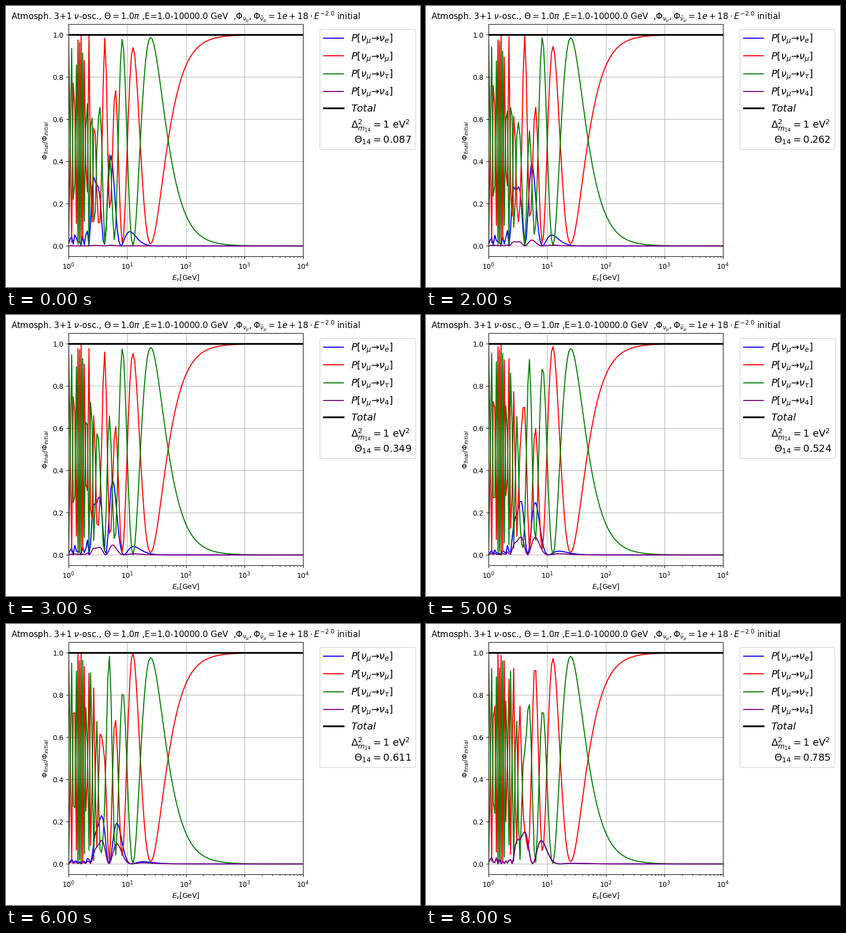
A matplotlib script that plays this animation: 821 by 559 pixels, repeating every 9 s.

```python
import numpy as np
import matplotlib.pyplot as plt
from matplotlib.animation import FuncAnimation

plt.rcParams["font.family"] = "DejaVu Sans"

W, H, DPI = 821, 559, 100
KM = 5.06773e9        # 1 km in 1/eV
R_EARTH = 6371.0
ATMOSPHERE = 22.0     # production height, km
STEPS = 150           # radial steps from surface to centre

energy = np.logspace(0, 4, 150)
angles = np.radians(np.arange(5, 50, 5))


def density(x):
    """Simplified PREM density in g/cm^3 at x = r/R."""
    if x < 0.1917:
        return 13.09 - 8.84 * x**2
    if x < 0.5462:
        return 12.49 - 8.65 * x**2
    if x < 0.8948:
        return 7.44 - 3.40 * x
    return max(11.25 - 8.03 * x, 3.37)


def rotation(i, j, a):
    m = np.eye(4)
    m[i, i] = m[j, j] = np.cos(a)
    m[i, j], m[j, i] = np.sin(a), -np.sin(a)
    return m


def vacuum_hamiltonian(th14):
    u = (rotation(0, 3, th14) @ rotation(1, 2, 0.737324)
         @ rotation(0, 2, 0.148190) @ rotation(0, 1, 0.583996))
    mass = u @ np.diag([0, 7.5e-5, 2.56e-3, 1.0]) @ u.T
    return mass / (2e9 * energy[:, None, None])


def potential(x):
    ye = 0.4656 if x < 0.5462 else 0.4957
    cc = 7.632e-14 * density(x) * ye
    nc = -0.5 * cc * (1 - ye) / ye
    return np.diag([cc + nc, nc, nc, 0])


def evolve(ham, km):
    w, v = np.linalg.eigh(ham)
    phase = np.exp(-1j * w * km * KM)
    return (v * phase[..., None, :]) @ np.swapaxes(v, -1, -2)


def probabilities():
    """P(nu_mu -> x) straight through the Earth, shape (angle, energy, x)."""
    ham = np.array([vacuum_hamiltonian(a) for a in angles])
    half = np.eye(4)
    for k in range(STEPS):
        x = 1 - (k + 0.5) / STEPS
        half = evolve(ham + potential(x), R_EARTH / STEPS) @ half
    # the second half of the path mirrors the first
    full = np.swapaxes(half, -1, -2) @ half @ evolve(ham, ATMOSPHERE)
    return np.abs(full[..., :, 1]) ** 2


def angle_label(th14):
    return ("$\\Delta_{m_{14}}^2=1$ eV$^2$\n"
            f" $\\Theta_{{14}}={th14:.3f}$")


prob = probabilities()

fig = plt.figure(figsize=(W / DPI, H / DPI), dpi=DPI, facecolor="white")
ax = fig.add_axes([124 / W, 60.7 / H, 465 / W, 462 / H])
ax.set_xscale("log")

curves = []
for color, name in zip(["blue", "red", "green", "purple"],
                       [r"e", r"\mu", r"\tau", "4"]):
    label = rf"$P[\nu_{{\mu}}→\nu_{{{name}}}]$"
    curves += ax.plot(energy, energy * 0, color=color, lw=1.5, label=label)
ax.plot(energy, np.ones_like(energy), color="black", lw=2.5, label="$Total$")
ax.plot([], [], " ", label=angle_label(angles[0]))

ax.set_xlim(1, 1e4)
ax.set_ylim(-0.05, 1.05)
ax.grid(True)
ax.set_xlabel(r"$E_{\nu}$[GeV]")
ax.set_ylabel(r"$\Phi_{final}/\Phi_{initial}$")
ax.set_title(r"Atmosph. 3+1 $\nu$-osc., $\Theta=1.0\pi$ ,E=1.0-10000.0 GeV  ,"
             r"$\Phi_{\nu_{\mu}},\Phi_{\bar{\nu}_{\mu}}=1e+18\cdot E^{-2.0}$"
             " initial", fontsize=12)
legend = ax.legend(bbox_to_anchor=(1.05, 1), loc="upper left", fontsize=14)


def update(i):
    for k, curve in enumerate(curves):
        curve.set_ydata(prob[i, :, k])
    legend.get_texts()[-1].set_text(angle_label(angles[i]))
    return curves


anim = FuncAnimation(fig, update, frames=len(angles), interval=1000,
                     repeat=True, repeat_delay=0, blit=False)
plt.show()
```
